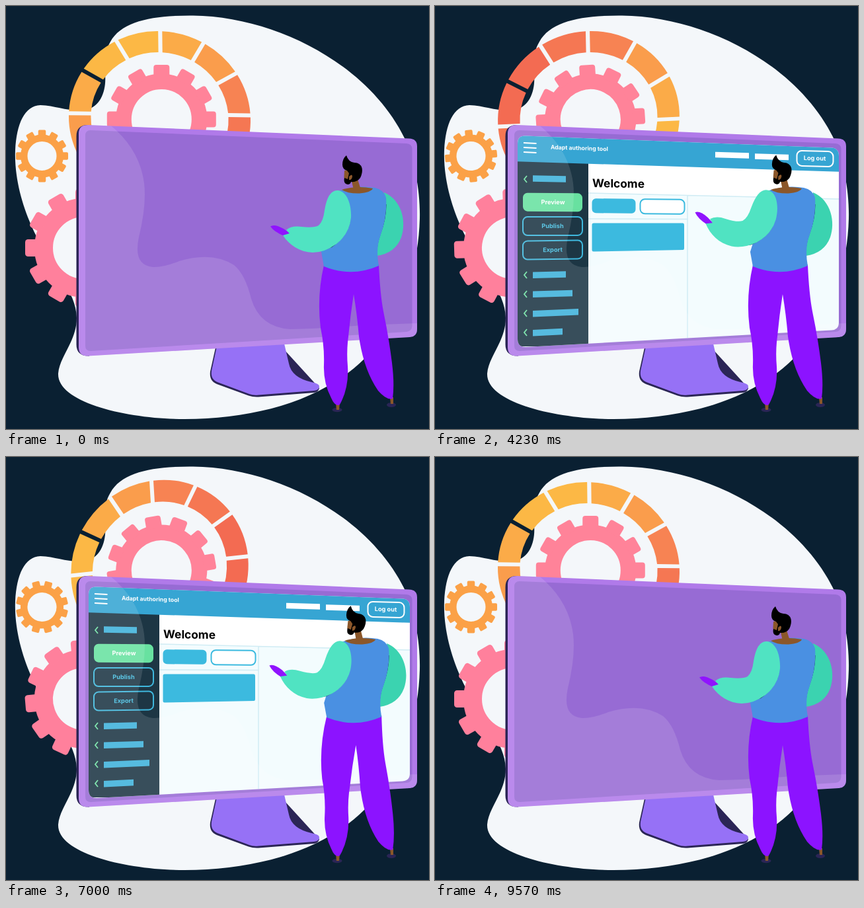
Write an HTML page that moves like this. It is 640 by 640 pixels and loops after 9610 ms.

```html
<!DOCTYPE html>
<html lang="en">
<head>
<meta charset="utf-8">
<title>Authoring tool</title>
<style>
  html, body { margin: 0; width: 100%; height: 100%; overflow: hidden; background: #0a2032; }
  svg { display: block; width: 100%; height: 100%; }
  text { font-family: Inter, "Open Sans", sans-serif; font-weight: 700; }
</style>
</head>
<body>
<svg viewBox="0 0 640 640">
  <defs>
    <clipPath id="screenClip"><path d="M137 196.500L600 214.500Q611 215 611 227V479Q611 489.500 600 490.500L137 516Q125 516 125 504V208Q125 196 137 196.500Z"/></clipPath>
    <clipPath id="monitorClip"><path d="M124 180L610 200.500Q622 201 622 212V489Q622 500 611 501L124 529.500Q110 530 110 516V193Q110 180 124 180Z"/></clipPath>
  </defs>

  <path fill="#f4f7fa" d="M158 54C175 23 222 14 283 14.500C408 16 548 88 603 200C620 239 627 285 626 322C624 398 598 475 543 533C480 596 379 625 270 625C184 625 77 600 79 556C81 530 107 507 107 472C106 430 70 400 48 352C30 318 12 268 14 218C16 178 28 151 52 150C78 151 96 161 122 157C143 152 152 128 150 104C149 82 149 69 158 54Z"/>

  <g id="gears"></g>

  <path fill="#2b2556" d="M317 517L309 553Q307 567 319 572L367 589.500Q374 592 382 591.500L466 585Q473 584 474 578L421 520Z"/>
  <path fill="#9671f6" d="M319 515L311 552Q309 565 321 569.500L368 587Q374 589.500 382 588.500L466 582Q474 581 474 575.500Q474 571 462 569Q432 562 428 541L421 511Z"/>

  <path fill="#2b2556" d="M124 180Q106.500 180 106.500 197V512Q106.500 530 126 529.500Z"/>
  <g clip-path="url(#monitorClip)">
    <path fill="#b07ae9" d="M100 170H630V540H100Z"/>
    <path fill="#976bd4" d="M128 188L606 208Q614 208.500 614.500 216V484Q614 492 606 493L128 522Q120 522 120 514V196Q120 188 128 188Z"/>
    <g id="ui" clip-path="url(#screenClip)"></g>
    <path fill="#fff" opacity=".12" d="M155 178Q202 215 209 268Q213 300 201 350Q192 392 222 395Q238 396 262 386Q312 371 345 392Q362 406 371 443Q384 486 430 489Q480 488 540 483L622 480V540H100V178Z"/>
  </g>

  <ellipse cx="501" cy="611" rx="7.500" ry="3.200" fill="#2b2556"/>
  <ellipse cx="583" cy="603.500" rx="7" ry="3.500" fill="#2b2556"/>
  <path fill="#8b572a" d="M499 600H505L504 611H500ZM581 592H586L586 602H582Z"/>
  <path id="legs" fill="#8c13ff" d="M481 392Q523 408 564 391Q566 436 571 462Q579 500 584 540Q588 572 585 594Q576 597 563 582Q541 550 534 500Q531 465 526 436Q521 468 518 500Q515 522 517 545Q519 578 505 603Q498 607 492 593Q480 570 481 543Q482 515 476 487Q470 440 481 392Z"/>
  <g id="torso">
    <path fill="#3bd3b0" d="M572 282C600 294 606 328 598 350Q589 374 561 378Q559 365 566 345Q575 310 572 282Z"/>
    <path fill="none" stroke="#14213d" d="M575 300Q575 322 566 346Q560 362 561 378"/>
    <path fill="#4a90e2" d="M500 281Q530 270 558 275Q572 278 575 290Q577 318 567 346Q559 366 564 393Q523 411 481 394L477 372L490 330Z"/>
    <path fill="#8b572a" d="M508 278Q530 271 555 276Q552 282 535 283.500Q517 284 508 278Z"/>
    <g id="head">
      <path fill="#8b572a" d="M512 249L511.500 258Q511 264 517 266L523 265L526 278H537L532 262L521 247Z"/>
      <path fill="#000" d="M512 260Q510 269 517 270Q521 270 522 266Q531 267 536 260Q540 252 538.500 245Q536 237 527 237Q518 236 515 226Q509 231 509 240Q509 247 516 249L519 253L517 262Z"/>
      <path fill="#8b572a" d="M519 258Q524 253 524 258Q523 264 519 263Z"/>
    </g>
    <g id="arm">
      <path fill="#10182c" d="M521 318Q522 344 493 365L475 371L500 330Z"/>
      <path fill="#9013fe" d="M400 333.500Q406 329 420 337L430 344L421 348Q406 342 400 333.500Z"/>
      <path fill="#50e3c2" d="M502 279C516 280 523 301 522 320Q520 344 500 360Q482 373 464 373C444 372 429 362 419 347L429 344L424 339Q432 332 447 334Q466 336 473 332Q480 326 482 309Q487 278 502 279Z"/>
    </g>
  </g>
</svg>
<script>
const LOOP = 9610, SPAN = 9600;
const byId = id => document.getElementById(id);
const smooth = u => u * u * (3 - 2 * u);

// Eased value of a track of [time, value] pairs.
function track(keys, t) {
  const i = keys.findIndex(key => key[0] > t);
  if (i < 0) return keys[keys.length - 1][1];
  const [t0, v0] = keys[i - 1], [t1, v1] = keys[i];
  return v0 + (v1 - v0) * smooth((t - t0) / (t1 - t0));
}

// ---- gears ----
const twelve = make => Array.from({ length: 12 }, (_, i) => make(i)).join('');

function gear(id, x, y, hole, body, tip, width, color) {
  const tooth = `x="${-width / 2}" y="${-tip}" width="${width}" height="${tip - body + 5}" rx="${width / 6}"`;
  return `<g transform="translate(${x} ${y})"><g id="${id}" fill="${color}">
    <circle r="${(hole + body) / 2}" fill="none" stroke="${color}" stroke-width="${body - hole}"/>
    ${twelve(i => `<rect ${tooth} transform="rotate(${i * 30})"/>`)}</g></g>`;
}

// Segments are cut along lines that meet slightly off the ring's centre.
function ringSegment(i) {
  const colors = ['#fcb845', '#fbab48', '#fa9d4c', '#f78353', '#f57753', '#f36b52'];
  const hub = [2.3, -6.3], halfGap = 3;
  const cut = (bearing, side, radius) => {
    const a = bearing * Math.PI / 180;
    const dx = Math.sin(a), dy = -Math.cos(a);
    const px = hub[0] - dy * side * halfGap, py = hub[1] + dx * side * halfGap;
    const along = px * dx + py * dy;
    const d = -along + Math.sqrt(along * along - px * px - py * py + radius * radius);
    return `${px + dx * d} ${py + dy * d}`;
  };
  const a = -30 + i * 30, b = a + 30, outer = 134.7, inner = 102;
  return `<path fill="${colors[Math.min(i, 11 - i)]}" d="M${cut(a, 1, outer)}
    A${outer} ${outer} 0 0 1 ${cut(b, -1, outer)}L${cut(b, -1, inner)}
    A${inner} ${inner} 0 0 0 ${cut(a, 1, inner)}Z"/>`;
}

byId('gears').innerHTML =
  `<g transform="translate(232.5 170)"><g id="ring"><g transform="rotate(15) scale(1.024 .976) rotate(-15)">
    ${twelve(ringSegment)}</g></g></g>` +
  gear('middleGear', 235.3, 171.5, 45.5, 69, 82.5, 24, '#ff8399') +
  gear('smallGear', 54.5, 227, 22, 32.5, 39.5, 11.5, '#fba147') +
  gear('bigGear', 118, 366, 47, 75, 89, 26, '#ff809c');

// ---- screen contents, slanted to follow the monitor's perspective ----
const slant = (x, y) => {
  const s = (328 - y) * 0.000303;
  return `transform="matrix(1 ${s} 0 1 0 ${-s * x})"`;
};
const box = (x, y, w, h, r, paint) =>
  `<rect x="${x}" y="${y}" width="${w}" height="${h}" rx="${r}" ${paint} ${slant(x + w / 2, y + h / 2)}/>`;
const label = (x, y, size, color, text, anchor = 'start') =>
  `<text x="${x}" y="${y}" font-size="${size}" fill="${color}" text-anchor="${anchor}" ${slant(x, y)}>${text}</text>`;
const fill = color => `fill="${color}"`;
const outline = (color, inside = 'none') => `fill="${inside}" stroke="${color}" stroke-width="2"`;
const menuItem = (y, width) =>
  `<path d="M139 ${y - 5}L135 ${y}L139 ${y + 5}" fill="none" stroke="#6fe3a4" stroke-width="1.8"/>` +
  box(148, y - 4.5 - width / 70, width, 9.5, 0, fill('#3fb2da'));

byId('ui').innerHTML =
  `<path fill="#f3fcfe" d="M120 190H615V520H120Z"/>
   <path fill="#fff" d="M232 230L611 245V292L232 283Z"/>
   <path fill="none" stroke="#d0ecf4" stroke-width="1.5" d="M232 283L611 292M382 287V502M232 322L382 322.5"/>
   <path fill="#1d3644" d="M120 230H232V515H120Z"/>
   <path fill="#36a5d3" d="M120 190H615V251L120 235Z"/>
   <path fill="none" stroke="#fff" stroke-width="2" d="M134 207L153.500 208M134 214L153.500 215M134 221L153.500 222"/>` +
  label(175, 216.5, 8.7, '#fff', 'Adapt authoring tool') +
  box(424, 221.5, 51, 8.5, 0, fill('#fff')) +
  box(484, 224, 51, 8.5, 0, fill('#fff')) +
  box(547.5, 219.5, 55, 23, 7.5, outline('#fff')) +
  label(574.5, 233.5, 9.2, '#fff', 'Log out', 'middle') +
  label(238, 274, 17.3, '#000', 'Welcome') +
  box(133, 283, 90, 28, 7, fill('#68e1a0')) +
  label(178.5, 300, 9.2, '#fff', 'Preview', 'middle') +
  box(133, 319, 90, 28, 7, outline('#3fb8de')) +
  label(178, 336, 9.2, '#46c0e4', 'Publish', 'middle') +
  box(133, 355, 90, 28, 7, outline('#3fb8de')) +
  label(178, 372, 9.2, '#46c0e4', 'Export', 'middle') +
  [[262, 50], [407, 50], [436, 60], [465, 69], [494, 45]].map(item => menuItem(...item)).join('') +
  box(237.5, 291.5, 66, 22, 6, fill('#3cbadf')) +
  box(310.5, 292.5, 67, 22, 7, outline('#3cbadf', '#fff')) +
  `<path fill="#3cbadf" d="M240 328.500L375 328.500Q377 328.500 377 331V366.500Q377 369 375 369L240 371.500Q237.500 371.500 237.500 369V331Q237.500 328.500 240 328.500Z"/>`;

// ---- motion ----
const SWAY = [[0, 0], [2500, 5], [5700, -4], [7300, 5], [SPAN, 0]];
const ARM = [[0, 0], [2200, 12], [6500, 10.2], [SPAN, 0]];
const HEAD = [[0, 0], [2000, 14], [4800, 0], [6200, 0], [7600, 5], [SPAN, 0]];
const SCREEN = [[0, 0], [500, 0], [1500, 1], [8100, 1], [9100, 0], [SPAN, 0]];
const TURNS = { ring: 1, bigGear: 1, middleGear: 2, smallGear: 3 };
const move = (id, transform) => byId(id).setAttribute('transform', transform);

function draw(now) {
  const t = now % LOOP;
  const turn = smooth(Math.min(t / SPAN, 1)) * 360;
  for (const id in TURNS) move(id, `rotate(${turn * TURNS[id]})`);

  const sway = track(SWAY, t), lean = sway / 212;
  move('legs', `matrix(1 0 ${-lean} 1 ${lean * 605} 0)`);
  move('torso', `translate(${sway} 0)`);
  move('arm', `rotate(${track(ARM, t)} 505 290)`);
  move('head', `rotate(${track(HEAD, t)} 530 273)`);
  byId('ui').setAttribute('opacity', track(SCREEN, t));
}

const start = performance.now();
function tick() {
  draw(performance.now() - start);
  requestAnimationFrame(tick);
}
tick();
</script>
</body>
</html>
```
